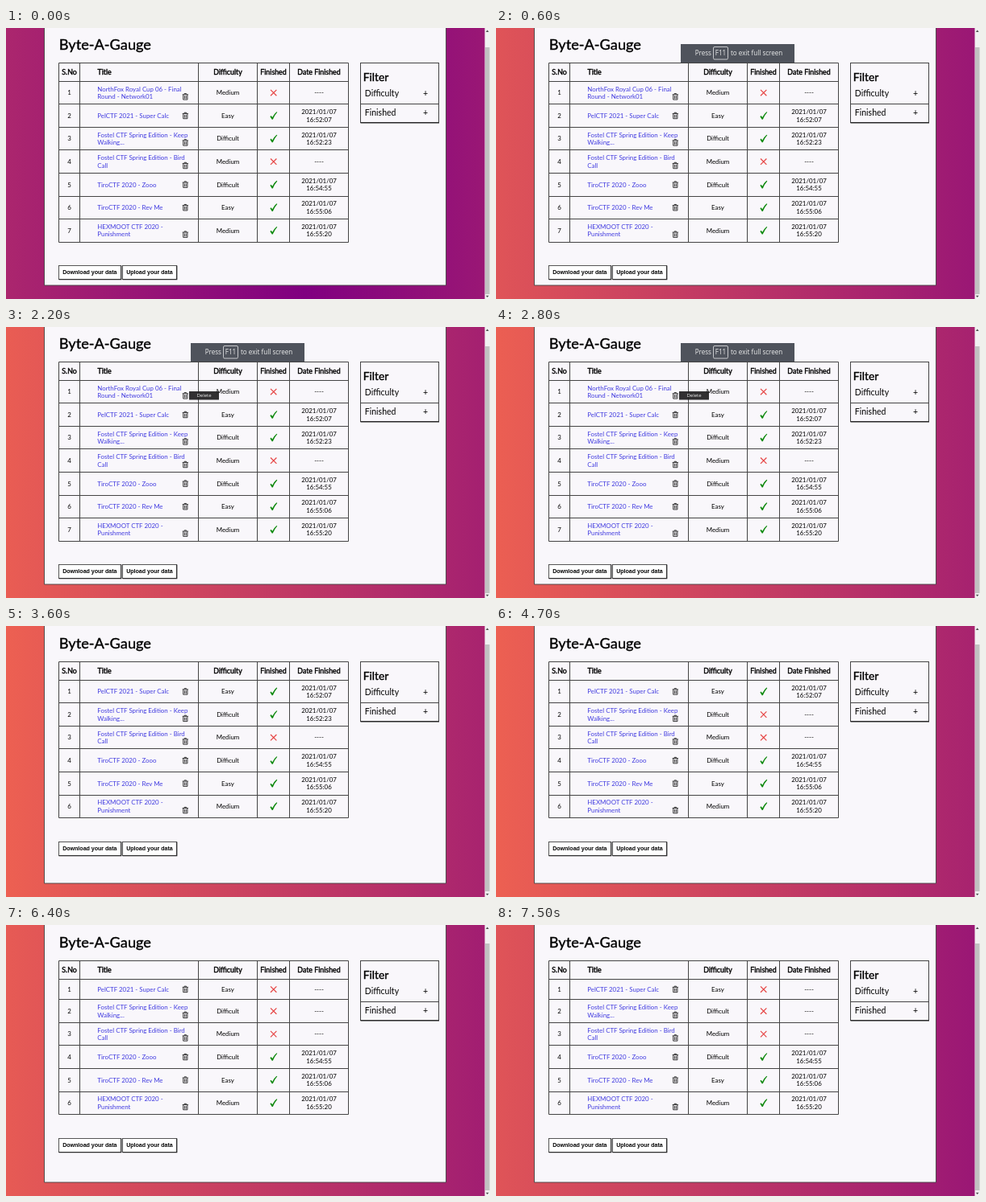
An HTML page for the animation above (7.6 s loop, 600 px wide and 337 px high).

```html
<!DOCTYPE html>
<html lang="en">
<head>
<meta charset="utf-8">
<title>Challenge tracker</title>
<style>
  html, body { margin: 0; width: 100%; height: 100%; overflow: hidden; }
  svg { display: block; width: 600px; height: 337px; font: 7.9px Lato, sans-serif; }
  .line { fill: none; stroke: #444; }
  .mid { text-anchor: middle; }
  .bold { stroke: #000; stroke-width: .4px; }
  .head { font-size: 8.8px; }
  .link { fill: #413be0; }
  .button { font: bold 7.05px "Liberation Sans", Arial, sans-serif; }
  .hint { font: 8.1px "Open Sans", "Noto Sans", sans-serif; fill: #eceded; }
  .tip { font: 6px "Open Sans", "Noto Sans", sans-serif; fill: #eee; text-anchor: middle; }
</style>
</head>
<body>
<svg viewBox="0 0 600 337">
  <defs>
    <linearGradient id="sky" gradientUnits="userSpaceOnUse" y1="0" y2="0" spreadMethod="reflect">
      <stop stop-color="#ff704a"/><stop offset="1" stop-color="#800080"/>
    </linearGradient>
    <path id="bin" d="M-3.6-2.7H3.6M-1.2-3v-.9H1.2v.9M-2.6-2.5V3.6H2.6V-2.5M-.9-1.3V2.5M.9-1.3V2.5"
      fill="none" stroke="#222" stroke-width=".9"/>
    <path id="yes" d="M-4.3 1L-3.1-.1L-1.5 1.9Q.8-2.6 3.7-5L4.6-4.4Q1.2-.7-.9 4.6H-2Z" fill="#108a10"/>
    <path id="no" d="M-3.7-3.7L3.7 3.7M3.7-3.7L-3.7 3.7" stroke="#e64545" stroke-width="1.2"/>
  </defs>
  <rect width="594" height="337" fill="url(#sky)"/>
  <path d="M47.5-1V320H545.5V-1" fill="#f9f7fb" stroke="#444" stroke-width=".9"/>
  <g id="page"></g>
</svg>
<script>
const LOOP = 7600, JUMP = 100, HINT_END = 3000, DELETE = 3400, UNDO_SECOND = 4500, UNDO_FIRST = 5900;
const sky = document.getElementById('sky'), page = document.getElementById('page');
const columns = [65.5, 91.5, 238.5, 311.5, 351.5, 424.5];

const row = (title, level, time) => ({ title: title.split('|'), level, time });
const tasks = [
  row('NorthFox Royal Cup 06 - Final|Round - Network01', 'Medium'),
  row('PelCTF 2021 - Super Calc', 'Easy', '16:52:07'),
  row('Fostel CTF Spring Edition - Keep|Walking...', 'Difficult', '16:52:23'),
  row('Fostel CTF Spring Edition - Bird|Call', 'Medium'),
  row('TiroCTF 2020 - Zooo', 'Difficult', '16:54:55'),
  row('TiroCTF 2020 - Rev Me', 'Easy', '16:55:06'),
  row('HEXMOOT CTF 2020 -|Punishment', 'Medium', '16:55:20')
];

const text = (x, y, s, cls = '', size = '') =>
  `<text x="${x}" y="${y}" class="${cls}"${size && ` style="font-size:${size}px"`}>${s}</text>`;
const rect = (x, y, w, h, attrs) => `<rect x="${x}" y="${y}" width="${w}" height="${h}" ${attrs}/>`;
const path = (d, attrs = 'class="line"') => `<path d="${d}" ${attrs}/>`;
const use = (id, x, y) => `<use href="#${id}" x="${x}" y="${y}"/>`;
const snap = y => Math.floor(y) + .5;

// One or two lines centred on y
const lines = (x, y, list, cls) =>
  list.map((s, i) => text(x, y + 2.8 + (i - (list.length - 1) / 2) * 9.5, s, cls)).join('');

function table(rows, top) {
  let y = top + 22.8, grid = `M65.5 ${snap(top)}H424.5M65.5 ${snap(y)}H424.5`;
  let out = [['S.No', 78.5], ['Difficulty', 275], ['Finished', 331.5], ['Date Finished', 388]]
    .map(([s, x]) => text(x, top + 14.6, s, 'bold head mid')).join('');
  out += text(113.5, top + 14.6, 'Title', 'bold head');
  rows.forEach((r, i) => {
    const tall = r.time || r.title.length > 1, h = tall ? 28.55 : 25.5, c = y + h / 2;
    out += text(78.5, c + 2.8, i + 1, 'mid') + lines(113.3, c, r.title, 'link')
      + use('bin', 222.3, c + (r.title.length > 1 ? 4.9 : 0)) + text(275, c + 2.8, r.level, 'mid')
      + use(r.time ? 'yes' : 'no', 331.7, c)
      + lines(388, c, r.time ? ['2021/01/07', r.time] : ['----'], 'mid');
    y += h;
    grid += `M65.5 ${snap(y)}H424.5`;
  });
  for (const x of columns) grid += `M${x} ${snap(top)}V${snap(y)}`;
  return [out + path(grid), y];
}

const button = (x, y, w, s) =>
  rect(x, y, w, 17, 'fill="#fff" stroke="#444" stroke-width=".9"')
  + path(`M${x} ${y + 17.3}H${x + w + .3}V${y}`, 'fill="none" stroke="#222" stroke-width="1.1"')
  + text(x + 4.7, y + 10.9, s, 'button');

function filter(top) {
  return rect(439.5, top, 97, 74, 'class="line"')
    + path(`M439.5 ${top + 51}H536.5`)
    + path(`M439.5 ${top + 74.3}H537`, 'stroke="#222" stroke-width="1.3"')
    + text(442.7, top + 22.6, 'Filter', 'bold', 13.8)
    + ['Difficulty', 'Finished'].map((s, i) =>
      text(444.8, top + 41.5 + i * 24, s, '', 10.5) + text(520, top + 41.5 + i * 24, '+', 'mid', 10.5)).join('');
}

function scrollbar(dy) {
  return rect(593.5, 0, 6.5, 337, 'fill="#f1f1f1"')
    + rect(594, 24 - dy, 5.5, 307, 'fill="#c1c1c1"')
    + path('M594.8 5L596.7 2.6L598.6 5ZM594.8 332.7H598.6L596.7 335Z', 'fill="#505050"');
}

const hint = () => rect(229, 20, 141, 23, 'fill="#4a4e57" fill-opacity=".97"')
  + text(246.7, 34.2, 'Press', 'hint') + text(291, 34.2, 'to exit full screen', 'hint')
  + rect(269.5, 23.5, 18, 15.5, 'rx="1.5" fill="none" stroke="#d5d6d8" stroke-width=".9"')
  + text(278.5, 34.2, 'F11', 'hint mid');

const tip = (x, y, w, h, s) => rect(x, y, w, h, 'fill="#222" fill-opacity=".93"')
  + text(x + w / 2, y + h / 2 + 2.1, s, 'tip');

function draw(t) {
  const deleted = t >= DELETE, dy = deleted ? 1 : 0, top = 43.5 + dy;
  const rows = tasks.slice(dy).map(r => ({ ...r }));
  if (t >= UNDO_SECOND) rows[1].time = '';
  if (t >= UNDO_FIRST) rows[0].time = '';
  const [body, bottom] = table(rows, top);
  const y = snap(bottom + 29.8);
  let out = text(65.8, 27 + dy, 'Byte-A-Gauge', 'bold', 18.2) + body + filter(top)
    + button(65.5, y, 77, 'Download your data') + button(144.5, y, 67, 'Upload your data') + scrollbar(dy);
  if (t >= JUMP && t < HINT_END) out += hint();
  if (t >= 1900 && !deleted) out += tip(227, 80, 37, 10.5, 'Delete');
  if (t >= 4100 && t < UNDO_SECOND) out += tip(338, 101.5, 66, 15.5, 'Mark As Un-Done');
  if (t >= 5100 && t < UNDO_FIRST) out += tip(338, 72.5, 66, 15.5, 'Mark As Un-Done');
  return out;
}

let shown = '';
function frame() {
  const t = performance.now() % LOOP;
  const shift = t < JUMP ? .66 : .14 + .11 * ((t - 4050) / 3450) ** 2;
  sky.setAttribute('x1', -shift * 1090);
  sky.setAttribute('x2', (1 - shift) * 1090);
  const next = draw(t);
  if (next !== shown) page.innerHTML = shown = next;
  requestAnimationFrame(frame);
}
frame();
</script>
</body>
</html>
```
